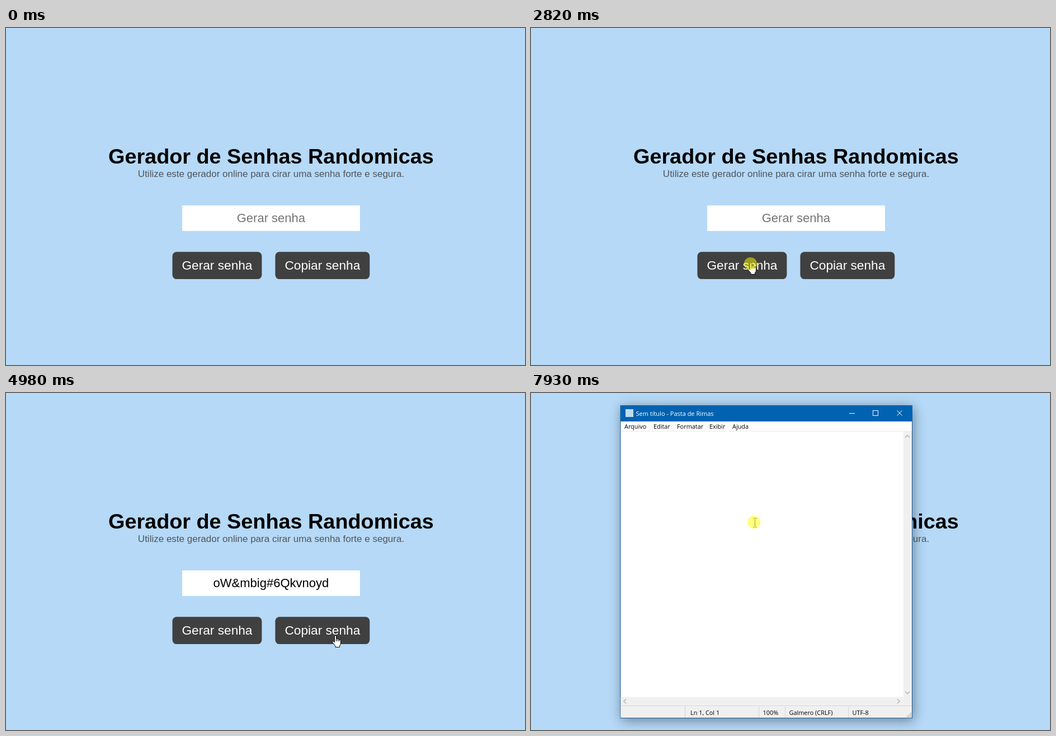
An HTML page with a canvas for the animation above (8000 ms loop, 928 px wide and 604 px high).

```html
<!DOCTYPE html>
<html lang="pt-BR">
<head>
<meta charset="utf-8">
<title>Gerador de Senhas</title>
<style>
html, body { margin: 0; width: 100%; height: 100%; overflow: hidden; background: #b5d9f7; }
canvas { display: block; }
</style>
</head>
<body>
<canvas id="stage" width="928" height="604"></canvas>
<script>
const ctx = document.getElementById('stage').getContext('2d');
const LOOP = 8000;
const ARIAL = '"Liberation Sans", Arial, sans-serif';
const SYSTEM = '"Open Sans", "Noto Sans", sans-serif';

const buttons = [
  { x: 297.5, y: 401.2, w: 159.9, h: 48.9, label: 'Gerar senha', down: [2900, 2950] },
  { x: 481.4, y: 401.2, w: 168.9, h: 48.9, label: 'Copiar senha', down: [5450, 5580] }
];

// Each move runs through its points in a fixed number of visible steps.
const moves = [
  { at: 320, span: 70, steps: 2, path: [[812, 503], [722, 432]] },
  { at: 1930, span: 560, steps: 9, path: [[466, 387], [428, 409], [367, 426], [381, 423], [393, 421]] },
  { at: 4360, span: 620, steps: 9, path: [[414, 421], [469, 441], [528, 438], [572, 436], [589, 435]] },
  { at: 7320, span: 350, steps: 6, path: [[558, 496], [468, 365], [419, 267], [400.5, 232.5]] }
];

const clicks = [
  { from: 2820, to: 2950, x: 392.5, y: 422.5 },
  { from: 5450, to: 5580, x: 588.5, y: 436.5 },
  { from: 7930, to: 8000, x: 398.5, y: 231.5 }
];

const within = (t, from, to) => t >= from && t < to;

function rect(x, y, w, h, color) {
  ctx.fillStyle = color;
  ctx.fillRect(x, y, w, h);
}

function text(str, x, y, font, color, align = 'left') {
  ctx.font = font;
  ctx.fillStyle = color;
  ctx.textAlign = align;
  ctx.fillText(str, x, y);
}

function line(points, color, width = 1) {
  ctx.beginPath();
  points.forEach(([x, y]) => ctx.lineTo(x, y));
  ctx.strokeStyle = color;
  ctx.lineWidth = width;
  ctx.stroke();
}

function pointerAt(t) {
  const move = moves.filter(m => t >= m.at).pop();
  if (!move || within(t, 6190, 7320)) return null;
  const last = move.steps - 1;
  const step = Math.min(last, Math.floor((t - move.at) / move.span * last + 1e-6));
  const pos = step / last * (move.path.length - 1);
  const i = Math.min(Math.floor(pos), move.path.length - 2);
  const [a, b] = [move.path[i], move.path[i + 1]];
  const mix = k => a[k] + (b[k] - a[k]) * (pos - i);
  return { x: mix(0), y: mix(1) };
}

function drawPage(t) {
  rect(0, 0, 928, 604, '#b5d9f7');
  text('Gerador de Senhas Randomicas', 473.9, 242.5, `bold 37.8px ${ARIAL}`, '#000', 'center');
  text('Utilize este gerador online para cirar uma senha forte e segura.', 474, 267.2, `17px ${ARIAL}`, '#50555a', 'center');

  rect(315, 318, 318, 45.8, '#fff');
  const filled = t >= 2950;
  text(filled ? 'oW&mbig#6Qkvnoyd' : 'Gerar senha', 473.9, 347.8, `22px ${ARIAL}`, filled ? '#000' : '#757575', 'center');

  for (const b of buttons) {
    ctx.beginPath();
    ctx.roundRect(b.x, b.y, b.w, b.h, 7.5);
    ctx.fillStyle = within(t, ...b.down) ? '#363636' : '#404040';
    ctx.fill();
    text(b.label, b.x + b.w / 2, 433.3, `22.68px ${ARIAL}`, '#fff', 'center');
  }
}

function chevron(x, y, dx, dy) {
  const tip = [x + dx * 2, y + dy * 2];
  const wing = s => [x - dx * 2 + dy * 4 * s, y - dy * 2 + dx * 4 * s];
  line([wing(1), tip, wing(-1)], '#b3b8bd', 1.6);
}

function drawEditor(t) {
  ctx.save();
  ctx.shadowColor = 'rgba(0,0,0,.42)';
  ctx.shadowBlur = 20;
  ctx.shadowOffsetX = 2;
  ctx.shadowOffsetY = 4;
  rect(159.5, 22, 522.5, 561, '#1c5f98');
  ctx.restore();

  rect(160, 22, 522, 29, '#0063b1');
  rect(169, 29, 14, 14, '#bfdcec');
  text('Sem título - Pasta de Rimas', 187.5, 41, `11px ${SYSTEM}`, '#fff');
  rect(569, 36, 10, 1, '#fff');
  ctx.strokeStyle = '#fff';
  ctx.lineWidth = 1;
  ctx.strokeRect(611.5, 31.5, 9, 9);
  line([[654.5, 31.5], [663.5, 40.5]], '#fff');
  line([[663.5, 31.5], [654.5, 40.5]], '#fff');

  rect(160.5, 51, 520.5, 531, '#fff');
  const menu = { Arquivo: 167, Editar: 219, Formatar: 261, Exibir: 319, Ajuda: 360 };
  for (const item in menu) text(item, menu[item], 64, `10.9px ${SYSTEM}`, '#000');

  rect(160.5, 68, 520.5, 1, '#e9e9e9');
  rect(666, 69, 15, 477, '#f0f0f0');
  rect(160.5, 545, 520.5, 37, '#f0f0f0');
  chevron(673, 78, 0, -1);
  chevron(673, 537, 0, 1);
  chevron(168, 552.5, -1, 0);
  chevron(657, 552.5, 1, 0);

  rect(160.5, 560, 520.5, 1, '#d9d9d9');
  for (const x of [275, 407, 454, 567]) rect(x, 562, 1, 20, '#d5d5d5');
  const status = { 'Ln 1, Col 1': 285, '100%': 414.5, 'Galmero (CRLF)': 461.5, 'UTF-8': 574.5 };
  for (const item in status) text(item, status[item], 577, `10.9px ${SYSTEM}`, '#000');
  for (let row = 0; row < 3; row++)
    for (let col = 2 - row; col < 3; col++)
      rect(672 + col * 3, 573 + row * 3, 2, 2, '#b8b8b8');

  if (t < 7530) rect(164, 70, 1, 19, '#000');
}

function drawShape(x, y, d, join) {
  const shape = new Path2D(d);
  ctx.save();
  ctx.translate(x, y);
  ctx.lineJoin = join;
  ctx.lineWidth = 1;
  ctx.fillStyle = '#fff';
  ctx.strokeStyle = '#000';
  ctx.fill(shape);
  ctx.stroke(shape);
  ctx.restore();
}

function drawArrow(x, y) {
  drawShape(x, y, 'M.5 .8V16.2L4.1 12.9L6.5 18.2L8.9 17.2L6.6 12.1H11.4Z', 'miter');
}

function drawHand(x, y) {
  drawShape(x - 6, y - 1,
    'M4.5 13V2Q4.5 .5 6 .5T7.5 2V6.5Q9 5.6 10 7.2Q11.7 6.4 12.5 8Q15.5 7.6 15.5 10.5V15' +
    'Q15.5 17 13.5 19V21.5H6V19.5L1 13.2Q0 11.5 1.4 10.8Q3 10.4 4.5 13Z' +
    'M7.5 6.5V11M10 7.2V11M12.5 8V11', 'round');
}

function drawBeam(x, y) {
  const ink = '#45452c';
  line([[x, y - 7], [x, y + 7]], ink);
  for (const s of [-1, 1])
    line([[x - 3.5, y + s * 8], [x - 1, y + s * 8], [x, y + s * 7], [x + 1, y + s * 8], [x + 3.5, y + s * 8]], ink);
}

function drawPointer(t) {
  const p = pointerAt(t);
  if (!p) return;
  const over = b => within(p.x, b.x, b.x + b.w) && within(p.y, b.y, b.y + b.h);
  if (t >= 6990) drawBeam(Math.floor(p.x) + 0.5, Math.floor(p.y) + 0.5);
  else if (buttons.some(over)) drawHand(Math.round(p.x), Math.round(p.y));
  else drawArrow(Math.round(p.x), Math.round(p.y));
}

function drawClick(t) {
  const c = clicks.find(k => within(t, k.from, k.to));
  if (!c) return;
  ctx.beginPath();
  ctx.arc(c.x, c.y, 11.5, 0, Math.PI * 2);
  ctx.fillStyle = 'rgba(255,255,0,.5)';
  ctx.fill();
}

const start = performance.now();

function frame() {
  const t = (performance.now() - start) % LOOP;
  drawPage(t);
  if (t >= 6990) drawEditor(t);
  drawPointer(t);
  drawClick(t);
  requestAnimationFrame(frame);
}
frame();
</script>
</body>
</html>
```
